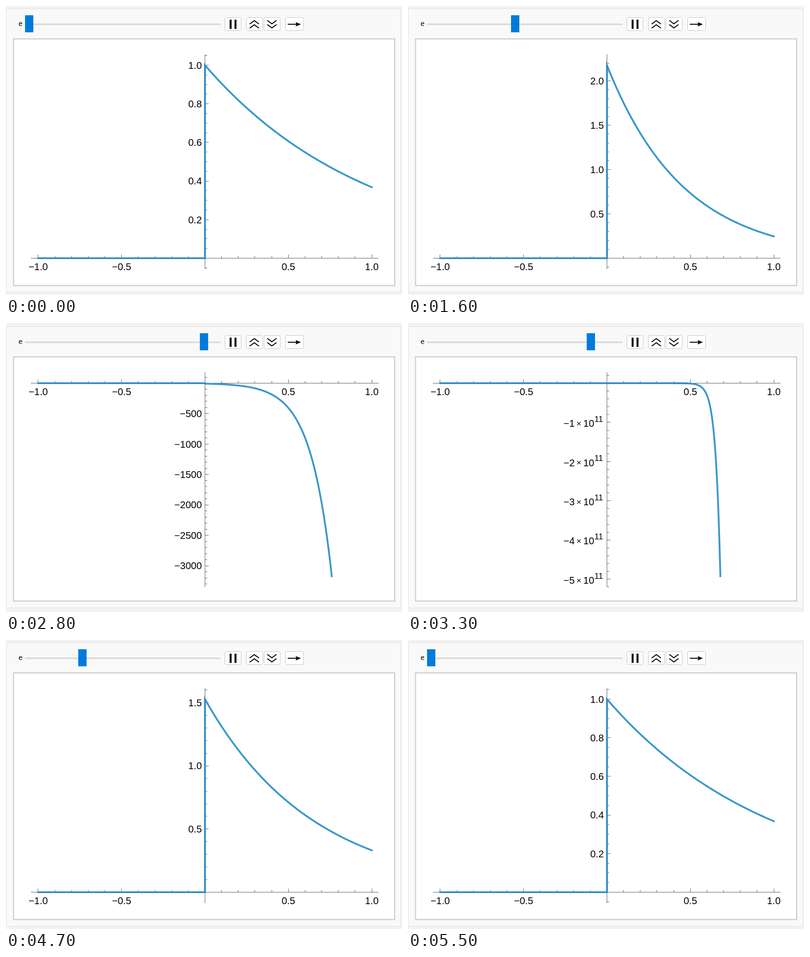
An HTML page with a canvas that plays this animation: 811 px wide and 593 px high, repeating every 6000 ms.

```html
<!DOCTYPE html>
<html>
<head>
<meta charset="utf-8">
<style>
  html, body { margin: 0; overflow: hidden; background: #f2f2f2; }
  canvas { display: block; }
</style>
</head>
<body>
<canvas id="stage" width="811" height="593"></canvas>
<script>
const ctx = document.getElementById('stage').getContext('2d');
const LOOP = 6000, STEP = 100, HOLD = 500, RAMP = 25;
const X0 = 407.5, UNIT = 341.6;           // horizontal axis mapping
const AXIS = 441, PAD = 22.5, SPAN = 396; // vertical axis length, padding, data span
const HALF_LABEL = 10.5;

// The parameter runs down in equal steps and back up, resting at 1.
function parameterAt(ms) {
  const n = Math.floor((ms - HOLD) / STEP);
  if (n < 0 || n >= 2 * RAMP) return 1;
  return 0.9965 - 0.0488367 * Math.min(n, 2 * RAMP - 1 - n);
}

function tickStep(range) {
  const raw = range / 5, decade = 10 ** Math.floor(Math.log10(raw)), m = raw / decade;
  const nice = m < 1.41 ? 1 : m < 3 ? 2 : m < 7.07 ? 5 : 10;
  return { step: nice * decade, minors: nice === 2 ? 4 : 5 };
}

function rect(color, x, y, w, h) {
  ctx.fillStyle = color;
  ctx.fillRect(x, y, w, h);
}

function line(points, color, width) {
  ctx.beginPath();
  points.forEach(([x, y], i) => i ? ctx.lineTo(x, y) : ctx.moveTo(x, y));
  ctx.strokeStyle = color;
  ctx.lineWidth = width;
  ctx.stroke();
}

function text(s, x, y, align = 'center', size = 20) {
  ctx.fillStyle = '#000';
  ctx.font = `${size}px "Liberation Sans", Arial, sans-serif`;
  ctx.textAlign = align;
  ctx.fillText(s, x, y + size * 0.36);
}

const signed = s => s.replace('-', '\u2212');

function valueLabel(value, step, y) {
  if (step >= 1e-5 && step < 1e6) {
    const digits = Math.max(0, -Math.floor(Math.log10(step) + 1e-9));
    text(signed(value.toFixed(digits)), 401, y, 'right');
    return;
  }
  const [mantissa, power] = value.toExponential(6).split('e');
  const exponent = signed(power.replace('+', ''));
  text(exponent, 399.5, y - 7, 'right', 17);
  const right = 399 - ctx.measureText(exponent).width;
  text('10', right, y + 2, 'right');
  text('\u00d7', right - 31.5, y + 2, 'center', 17);
  text(signed(String(+mantissa)), right - 40, y + 2, 'right');
}

function button(x, w) {
  ctx.beginPath();
  ctx.roundRect(x + 0.5, 23.5, w - 1, 27, 3);
  ctx.fillStyle = '#fff';
  ctx.fill();
  ctx.strokeStyle = '#c6c6c6';
  ctx.lineWidth = 1;
  ctx.stroke();
}

function controls(tau) {
  ctx.fillStyle = '#000';
  ctx.font = '15px "Open Sans", "Noto Sans", sans-serif';
  ctx.textAlign = 'left';
  ctx.fillText('e', 25.5, 41);
  rect('#cfcfcf', 39, 36, 400, 3);
  rect('#e6e6e6', 40, 37, 398, 1);
  rect('#007bdc', 39 + Math.floor(318.4 * (1 - tau)), 19, 17, 35);

  [[448, 34], [492, 34], [528, 34], [572, 38]].forEach(b => button(...b));
  rect('#000', 458, 28, 4, 19);
  rect('#000', 468, 28, 4, 19);
  ctx.lineCap = 'butt';
  for (const y of [30, 38.5]) {
    line([[499, y + 7], [508.5, y], [518, y + 7]], '#000', 2);
    line([[535, y - 0.5], [544.5, y + 6.5], [554, y - 0.5]], '#000', 2);
  }
  line([[577, 37.5], [596, 37.5]], '#000', 2);
  ctx.beginPath();
  ctx.moveTo(604, 37.5);
  ctx.lineTo(593, 33);
  ctx.lineTo(595, 37.5);
  ctx.lineTo(593, 42);
  ctx.fillStyle = '#000';
  ctx.fill();
}

function draw(ms) {
  const tau = parameterAt(ms), rate = 1 / tau, up = tau > 0, t = Math.abs(tau);
  const f = x => rate * Math.exp(-rate * x);

  // Steep curves lose a strip of width cut at their tall end.
  const cut = Math.max(0, 0.34314 - 0.78186 * t - 0.25234 * t * t);
  const from = up ? cut : 0, to = up ? 1 : 1 - cut;
  const extreme = f(up ? from : to), peak = Math.abs(extreme), scale = SPAN / peak;
  const { step, minors } = tickStep(peak * AXIS / SPAN);

  // Labels that stick out of the axis enlarge the panel, which stays centred.
  const above = up ? SPAN + 22 : 22, below = AXIS - above;
  const topTick = Math.floor(above / scale / step + 1e-6) * step;
  const extraTop = topTick > 0
    ? Math.max(0, Math.round(HALF_LABEL - (above - topTick * scale))) : 0;
  const extraBottom = Math.max(0, Math.round(17 + HALF_LABEL - below));
  const height = 32 + extraTop + AXIS + 29 + extraBottom;
  const shift = Math.floor((507 - height) / 2);

  rect('#f2f2f2', 0, 0, 811, 593);
  ctx.save();
  ctx.translate(0, shift);
  rect('#e2e2e2', 0, 5, 809, height + 76);
  rect('#f9f9f9', 1, 6, 807, height + 74);
  controls(tau);
  rect('#c8c8c8', 14.5, 66.5, 782.5, height + 1);
  rect('#fff', 16.5, 68.5, 778.5, height - 3);

  const axisTop = 99 + extraTop, zero = axisTop + above;
  const px = x => X0 + x * UNIT, py = y => zero + 0.5 - y * scale;
  const grey = '#666';

  rect(grey, 51, zero, 712, 1);
  rect(grey, 407, axisTop, 1, AXIS);
  for (let i = -10; i <= 10; i++) {
    const major = i % 5 === 0, len = major ? 7 : 4;
    if (!i) continue;
    rect(grey, Math.floor(px(i / 10)), zero - len, 1, len);
    if (major) text(signed((i / 10).toFixed(1)), px(i / 10), zero + 17.5);
  }
  const minor = step / minors;
  for (let i = Math.ceil(-below / scale / minor); i <= above / scale / minor + 1e-6; i++) {
    const major = i % minors === 0, y = py(i * minor);
    if (!i) continue;
    rect(grey, 408, Math.floor(y), major ? 7 : 4, 1);
    if (major) valueLabel(i * minor, step, y);
  }

  const curve = Array.from({ length: 301 }, (_, i) => {
    const x = from + (to - from) * i / 300;
    return [px(x), py(f(x))];
  });
  const flatEnd = up ? 0 : Math.max(0, to - Math.log(2 * SPAN) / t ** -1);
  const base = [[px(-1), py(0)], [X0, py(0)]];
  if (up) base.push([X0, py(peak)]);
  const blue = '#3b98cb';
  ctx.lineCap = 'square';
  ctx.lineJoin = 'miter';
  if (cut && up) {
    line(base, blue, 3.7);
    line(curve, blue, 3.7);
  } else {
    line([...base, ...curve], blue, 3.7);
  }
  // The stretches lying on the axes look darker.
  const onAxis = up ? base : [base[0], [px(flatEnd), py(0)]];
  line(onAxis, '#2584c0', 2);
  ctx.restore();
}

function tick() {
  draw(performance.now() % LOOP);
  requestAnimationFrame(tick);
}
tick();
</script>
</body>
</html>
```
